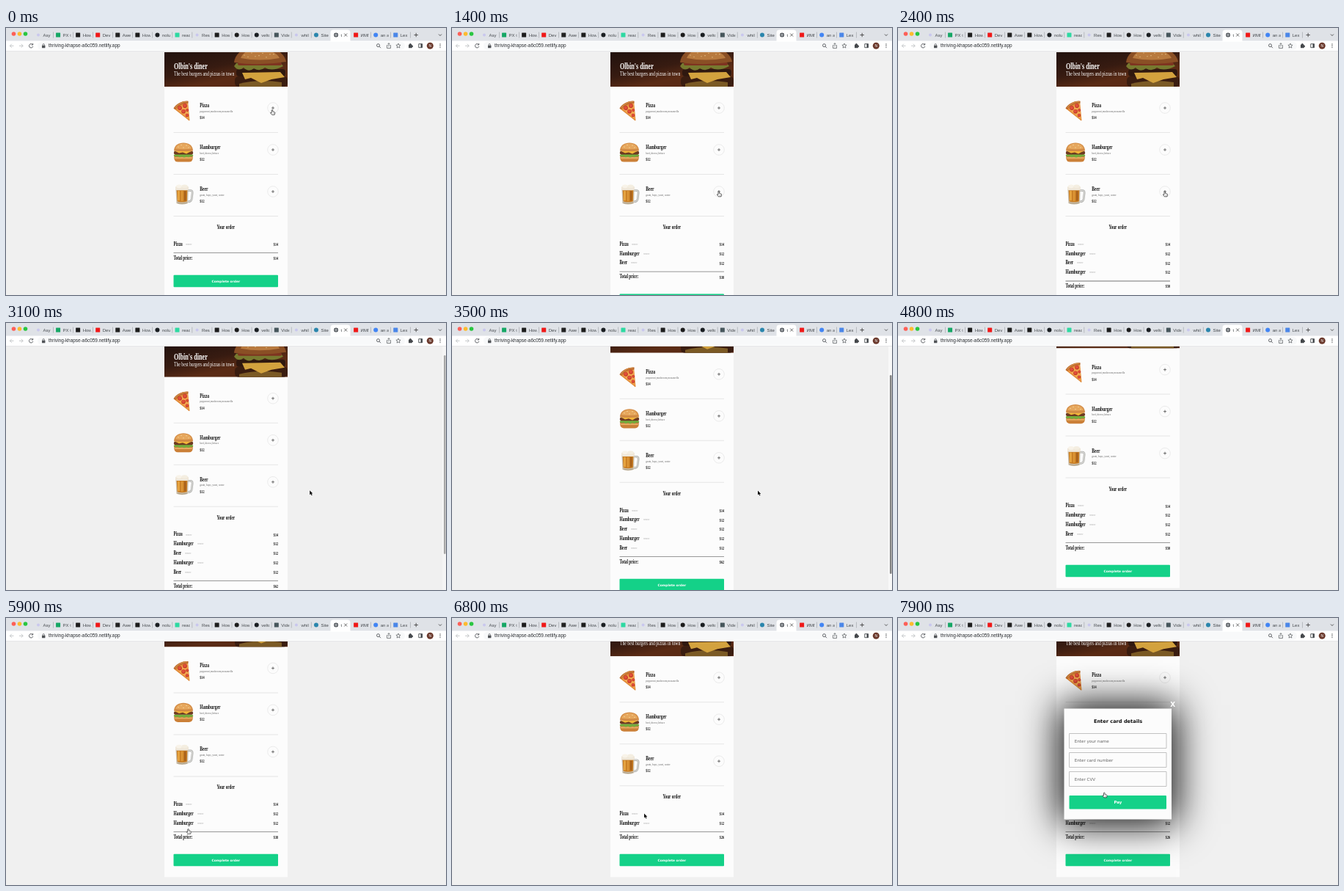
Animation, 600 px wide and 364 px high, one loop 8 s. Source, as an HTML page with a canvas:

```html
<!DOCTYPE html>
<html lang="en">
<head>
<meta charset="utf-8">
<title>Diner order</title>
<style>
html, body { margin: 0; width: 100%; height: 100%; overflow: hidden; background: #f0f0f0; }
canvas { display: block; width: 600px; height: 364px; }
</style>
</head>
<body>
<canvas id="stage" width="600" height="364"></canvas>
<script>
const ctx = document.getElementById('stage').getContext('2d');
const LOOP = 8000, VIEW_TOP = 32, ROW = 12.8;
const GREEN = '#14d188', HAIRLINE = '#e6e6e6';
const SLAB = '"Liberation Serif", serif';
const SLAB_WIDTH = .7;
const SANS = '"Liberation Sans", sans-serif';
const WIDE = '"DejaVu Sans", sans-serif';

const MENU = {
  P: { name: 'Pizza', desc: 'pepperoni,mushroom,mozzarella', price: 14, link: 16.5, draw: drawPizza },
  H: { name: 'Hamburger', desc: 'beef,cheese,lettuce', price: 12, link: 32.5, draw: drawBurger },
  B: { name: 'Beer', desc: 'grain, hops, yeast, water', price: 12, link: 15.5, draw: drawBeer }
};
const ORDERS = [[0, 'P'], [700, 'PH'], [1200, 'PHB'], [1900, 'PHBH'], [2600, 'PHBHB'],
  [4700, 'PHHB'], [5900, 'PHH'], [6500, 'PH']];
const SCROLL = [[3000, 0], [3400, 39.2], [3600, 39.2], [3900, 45.4]];
const CURSOR = [
  [0, 363, 111, 'hand'], [300, 363, 111, 'hand'], [620, 363, 168, 'hand'], [850, 363, 168, 'hand'],
  [1120, 363.8, 222.5, 'hand'], [1500, 363.8, 222.5, 'hand'], [1780, 363, 168, 'hand'],
  [2000, 363, 168, 'hand'], [2300, 363.8, 222.5, 'hand'], [2800, 363.8, 222.5, 'arrow'],
  [3150, 417, 228.5, 'arrow'], [3950, 417, 228.5, 'arrow'], [4500, 248.5, 273.5, 'hand'],
  [4700, 248.5, 273.5, 'text'], [5200, 248.5, 273.5, 'text'], [5500, 248.5, 287, 'hand'],
  [5950, 248.5, 287, 'arrow'], [6250, 262, 266.5, 'hand'], [6500, 262, 266.5, 'arrow'],
  [6850, 262, 266.5, 'arrow'], [7250, 300, 329, 'hand'], [7620, 300, 329, 'arrow'],
  [7850, 281.3, 237.5, 'hand']
];
const DIALOG_AT = 7600;

const TABS = [
  ['Asy', '#c9c7ee', 0], ['PX t', '#16a765', 1], ['How', '#1d1d1d', 1], ['Dev', '#f01818', 1],
  ['Awe', '#222', 1], ['How', '#1d1d1d', 1], ['nolu', '#1b1f23', 0], ['reac', '#2ed9a2', 1],
  ['Res', '#c9c7ee', 0], ['How', '#1d1d1d', 1], ['How', '#1d1d1d', 0], ['velto', '#1b1f23', 0],
  ['Vide', '#46565c', 1], ['whil', '#c9c7ee', 0], ['Site', '#2b86ad', 0], ['t', '#4b4f54', 0],
  ['ИМП', '#f01818', 1], ['an a', '#4285f4', 0], ['Lex', '#4a86e8', 1]
];
const ACTIVE_TAB = 15;

function rect(x, y, w, h, color, r = 0) {
  ctx.fillStyle = color;
  ctx.beginPath();
  ctx.roundRect(x, y, w, h, r);
  ctx.fill();
}
function disc(x, y, rx, color, ry = rx, angle = 0) {
  ctx.fillStyle = color;
  ctx.beginPath();
  ctx.ellipse(x, y, rx, ry, angle, 0, 7);
  ctx.fill();
}
function shape(d, fill, line, width = 1) {
  const p = new Path2D(d);
  if (fill) { ctx.fillStyle = fill; ctx.fill(p); }
  if (line) { ctx.strokeStyle = line; ctx.lineWidth = width; ctx.stroke(p); }
}
function text(str, x, y, font, color, align = 'left') {
  ctx.font = font;
  ctx.fillStyle = color;
  ctx.textAlign = align;
  ctx.fillText(str, x, y);
}
function at(x, y, draw, sx = 1, sy = sx) {
  ctx.save();
  ctx.translate(x, y);
  ctx.scale(sx, sy);
  draw();
  ctx.restore();
}
// The page's condensed slab face.
function slab(str, x, y, size, color = '#111', align = 'left', weight = 'bold') {
  at(x, y, () => text(str, 0, 0, `${weight} ${size}px ${SLAB}`, color, align), SLAB_WIDTH, 1);
}

const ease = u => u * u * (3 - 2 * u);
// Eased position on a list of [time, ...values] keys.
function track(keys, t) {
  let i = 0;
  while (i < keys.length - 1 && keys[i + 1][0] <= t) i++;
  const a = keys[i], b = keys[i + 1] || a;
  const u = b === a ? 0 : ease(Math.max(0, (t - a[0]) / (b[0] - a[0])));
  return a.map((v, k) => typeof v === 'number' ? v + (b[k] - v) * u : v);
}
const stepAt = (keys, t) => keys.filter(k => k[0] <= t).pop()[1];

function drawPizza() {
  shape('M1 11C4 5 12 0 20 1L22.5 27Q21.5 28 20 26Z', '#e08a3a');
  shape('M5 12Q11 6 20 4L21.5 25.5Z', '#f2a850');
  shape('M1.7 11.2C5 5.5 13 1.5 20.5 2.2', null, '#b9682c', 3);
  shape('M2.5 10C6 4.8 13 1.2 19 1.5', null, '#d8924c', 1.1);
  for (const [x, y, r] of [[9, 10, 2.9], [16, 7, 2.9], [14, 14.7, 2.8], [19.2, 13, 2], [18.9, 20, 2.2]]) {
    disc(x, y, r, '#bf3525');
    disc(x - .2, y - .3, r * .76, '#e0503a');
  }
}

function drawBurger() {
  rect(1.3, 19, 25.4, 7.6, '#cb8038', [1, 1, 5, 5]);
  rect(2, 20, 24, 2.2, '#e6aa62', 1);
  rect(1.2, 17.2, 25.6, 2.4, '#cf4a35', 1.2);
  shape('M.6 17.8Q1 16 4 16H24Q27 16 27.4 17.8Q26 20.6 23 19Q21 21.6 18 19.2Q15 22 12 19.2Q9 21.6 6 19Q3 21 .6 17.8Z', '#74ad3c');
  rect(.9, 11.8, 26.2, 4.6, '#6d3a22', 2);
  shape('M1.4 11.6H26.6L22 13.2L18 15.6L13 13.4L8 14.6L5 13Z', '#f3b63a');
  shape('M1 11.4C1 4 7 .4 14 .4S27 4 27 11.4Q14 12.8 1 11.4Z', '#d28b45');
  shape('M3 8.5C4 4 8 1.6 14 1.6S24 4 25 8.5Q14 10 3 8.5Z', '#e6a75d');
  for (const [x, y] of [[7, 6], [11, 3.6], [14, 7], [18, 4], [21, 7]]) disc(x, y, .8, '#f8e0a8', .5);
}

function drawBeer() {
  const handle = 'M19 8.5H23.3Q26.5 8.5 26.2 12L25.2 20Q24.7 23.8 20 23.8';
  shape(handle, null, '#a9a9a6', 2.6);
  shape(handle, null, '#dededb', 1.2);
  shape('M3.3 4H20.7L20.2 26Q12 29 4.4 26Z', '#cfc5b4');
  shape('M4.7 8H19.3L18.8 23.5Q12 25.5 5.6 23.5Z', '#c67b22');
  rect(6, 9, 3, 13.5, '#e5a33f', 1);
  rect(10.5, 9, 3, 14.2, '#dc9535', 1);
  rect(15, 9, 2.5, 13.5, '#a8611b', 1);
  shape('M5.5 25.3Q12 27.5 19 25.3', null, '#a99778', 1);
  rect(3, 2.2, 18, 6, '#f0e8da', 2.5);
  disc(8, 2.8, 3.8, '#f8f3e9', 2.4);
  disc(15.5, 2.7, 4, '#f4eee1', 2.3);
}

function drawBanner() {
  ctx.save();
  ctx.beginPath();
  ctx.rect(216, 33, 168, 47);
  ctx.clip();
  const wood = ctx.createLinearGradient(240, 33, 250, 80);
  wood.addColorStop(0, '#24130e');
  wood.addColorStop(.6, '#371b11');
  wood.addColorStop(1, '#5a2b15');
  rect(216, 33, 168, 47, wood);
  rect(312, 66, 72, 14, '#3a1d10', 5);
  shape('M318 76Q345 69 376 74V80H318Z', '#7b5a25');
  rect(314, 56, 67, 10, '#2f180f', 4);
  shape('M322 61L374 60L380 67L362 70L348 75L334 68L326 70Z', '#d3a23e');
  shape('M311 52Q317 60 324 54Q331 61 338 55Q346 60 353 54Q363 60 378 52L374 47L314 48Z', '#77792f');
  rect(316, 47, 60, 4, '#7e3420', 2);
  shape('M311 47C312 35 325 24 345 24S380 34 382 46Q346 52 311 47Z', '#8a4f25');
  shape('M320 41C324 31 336 27 348 28S370 35 373 41Q346 46 320 41Z', '#b87a3f');
  for (let i = 0; i < 9; i++) disc(325 + i * 5, 37 + 3 * Math.sin(i * 2.3), 1, '#dcb67c', .6);
  ctx.restore();
  slab("Olbin's diner", 229, 56, 11.6, '#fff');
  slab('The best burgers and pizzas in town', 229, 65, 8.2, '#fff', 'left', 'normal');
}

function drawMenuItem(item, i) {
  const y = i * 57;
  at(228, 99 + y, item.draw);
  slab(item.name, 264.3, 108 + y, 8);
  slab(item.desc, 264.3, 114.7 + y, 4.9, '#666', 'left', 'normal');
  slab('$' + item.price, 264.3, 124 + y, 5.9);
  ctx.strokeStyle = HAIRLINE;
  ctx.lineWidth = .8;
  ctx.beginPath();
  ctx.arc(364, 109 + y, 7.3, 0, 7);
  ctx.stroke();
  shape(`M362 ${109 + y}h4M364 ${107 + y}v4`, null, '#555', .8);
  rect(228.5, 142 + y, 142.5, 1, HAIRLINE);
}

function drawPage(order, scroll) {
  ctx.save();
  ctx.beginPath();
  ctx.rect(0, VIEW_TOP, 600, 364);
  ctx.clip();
  ctx.translate(0, -scroll);
  const extra = (order.length - 1) * ROW;
  rect(216, 33, 168, 335.3 + extra, '#fcfcfc');
  drawBanner();
  Object.values(MENU).forEach(drawMenuItem);
  slab('Your order', 299.7, 273.9, 7.4, '#111', 'center');
  let total = 0;
  [...order].forEach((key, i) => {
    const { name, price, link } = MENU[key], y = 296.7 + i * ROW;
    total += price;
    slab(name, 228.5, y, 7.7);
    slab('remove', 228.5 + link, y - .9, 4, '#aaa', 'left', 'normal');
    slab('$' + price, 371, y + .2, 5.9, '#111', 'right');
  });
  rect(228.5, 306.2 + extra, 142.5, .8, '#777');
  slab('Total price:', 228.5, 315.8 + extra, 7.5);
  slab('$' + total, 371, 316 + extra, 5.9, '#111', 'right');
  rect(228.5, 336.8 + extra, 142.5, 16.5, GREEN, 1);
  text('Complete order', 299.8, 346.7 + extra, `bold 4.4px ${WIDE}`, '#fff', 'center');
  ctx.restore();
}

function drawDialog() {
  // Only the shadow of this off-stage box is visible.
  ctx.save();
  ctx.shadowColor = '#000';
  ctx.shadowBlur = 50;
  ctx.shadowOffsetX = 1000;
  rect(-779.5, 117.5, 158.5, 163, '#000');
  ctx.restore();
  text('X', 374.7, 121.3, `bold 9px ${WIDE}`, '#fff', 'center');
  rect(226.5, 123.5, 146.5, 151, '#fcfcfc');
  text('Enter card details', 300, 143, `bold 6.6px ${WIDE}`, '#111', 'center');
  ['Enter your name', 'Enter card number', 'Enter CVV'].forEach((hint, i) => {
    const y = 157.5 + i * 26;
    ctx.strokeStyle = '#c2c2c2';
    ctx.lineWidth = 1;
    ctx.strokeRect(233.5, y, 132.5, 20);
    text(hint, 240.7, y + 12.2, `5.6px ${WIDE}`, '#666');
  });
  rect(233.5, 242, 132.5, 18.5, GREEN, 1);
  text('Pay', 299.8, 253.3, `bold 5.4px ${WIDE}`, '#fff', 'center');
}

function drawTabs() {
  rect(0, 0, 600, 18, '#dfe2e7');
  ['#fe5f57', '#febb2e', '#29c640'].forEach((c, i) => disc(10.5 + i * 8, 8, 2.8, c));
  rect(442.5, 2.5, 27, 16, '#fff', [4, 4, 0, 0]);
  TABS.forEach(([label, color, square], i) => {
    const x = 44 + i * 27.07;
    if (square) rect(x - 3, 6.5, 6, 6, color, .5);
    else disc(x, 9.5, color === '#c9c7ee' ? 2 : 3, color);
    ctx.save();
    ctx.beginPath();
    ctx.rect(x + 5, 0, i === ACTIVE_TAB ? 5 : 12.5, 18);
    ctx.clip();
    text(label, x + 6.5, 11.6, `6px ${SANS}`, '#45494d');
    ctx.restore();
    if (i !== ACTIVE_TAB && i !== ACTIVE_TAB - 1) rect(x + 20, 5.5, .7, 8, '#a5a9ae');
  });
  shape('M447.5 9.5h5M450 7v5', null, '#dfe2e7', .7);
  shape('M461.2 7.5l4 4M465.2 7.5l-4 4', null, '#444', .8);
  shape('M556.5 9.5h5.4M559.2 6.8v5.4M590 8.5l2 2l2 -2', null, '#444', .9);
}

function drawToolbar() {
  rect(0, 17.5, 600, 14.5, '#fff');
  rect(43, 18.7, 501, 11.2, '#f8f9fa', 5.6);
  rect(0, 31.2, 600, .8, '#dcdee0');
  shape('M10.5 24.3h-5M7.8 21.8l-2.5 2.5l2.5 2.5M18 24.3h5M20.7 21.8l2.5 2.5l-2.5 2.5', null, '#b7babd', .8);
  shape('M36.3 22.6A2.7 2.7 0 1 0 36.8 25M36.7 21v2h-2', null, '#505357', .9);
  rect(49, 23.8, 4.4, 3.4, '#505357', .5);
  shape('M50 24v-1.2a1.2 1.2 0 0 1 2.4 0v1.2', null, '#505357', .7);
  text('thriving-khapse-a6c059.netlify.app', 58, 26.4, `6.45px ${SANS}`, '#2c2f33');
  shape('M509.5 23.7a2 2 0 1 0 -4 0a2 2 0 1 0 4 0M509 25.2l2 2', null, '#505357', .9);
  shape('M520.5 23.5h-1v4h5v-4h-1M522 25.5v-4.7M520.6 22l1.4 -1.4l1.4 1.4', null, '#505357', .7);
  shape('M535 21l.9 2.1l2.2 .2l-1.7 1.5l.5 2.3l-1.9 -1.2l-1.9 1.2l.5 -2.3l-1.7 -1.5l2.2 -.2Z', null, '#505357', .7);
  rect(549, 22.5, 4.8, 4.8, '#45484c', .6);
  disc(551.4, 22.3, 1.2, '#45484c');
  disc(554, 24.9, 1.1, '#45484c');
  shape('M562.8 21.7h4.8v5h-4.8Z', null, '#45484c', .9);
  rect(565.5, 21.7, 2.2, 5, '#45484c');
  disc(578.3, 24.3, 4.5, '#6b392c');
  text('N', 578.3, 26.1, `5px ${SANS}`, '#fff', 'center');
  for (const y of [22, 24.3, 26.6]) disc(592, y, .7, '#45484c');
}

function drawCursor(x, y, kind) {
  ctx.lineJoin = 'round';
  at(x, y, () => {
    if (kind === 'hand') {
      shape('M-.8 1Q0 0 .8 1V3L3.2 3.6Q4 3.9 3.8 4.8L3.2 7.3H-.4L-2.5 4.6Q-2.2 3.6 -.8 4.7Z', '#fff', '#222', .7);
      shape('M1.2 4.8v1.3M2.3 4.8v1.3', null, '#555', .4);
    } else if (kind === 'text') {
      shape('M-1.2 -3.5Q0 -3.5 0 -2.6Q0 -3.5 1.2 -3.5M0 -2.6V2.8M-1.2 3.6Q0 3.6 0 2.7Q0 3.6 1.2 3.6', null, '#222', .8);
    } else {
      const arrow = 'M0 0V6L1.4 4.8L2.4 7L3.5 6.5L2.5 4.4H4.3Z';
      shape(arrow, null, '#fff', 1.1);
      shape(arrow, '#111');
    }
  });
}

function drawScrollbar(scroll, t) {
  if (t < 3000 || t > 4500) return;
  ctx.globalAlpha = Math.min(1, (t - 3000) / 150, (4500 - t) / 250);
  rect(595, VIEW_TOP, 5, 332, '#f8f8f8');
  rect(597, 71 + (scroll - 39.2) * .82, 2.6, 271, '#858585', 1.3);
  ctx.globalAlpha = 1;
}

function render(t) {
  const order = stepAt(ORDERS, t);
  // A shorter order shortens the page and so limits the scroll.
  const scroll = Math.min(track(SCROLL, t)[1], 2.2 + order.length * ROW);
  const [, x, y, kind] = track(CURSOR, t);
  rect(0, 0, 600, 364, '#f0f0f0');
  drawPage(order, scroll);
  drawScrollbar(scroll, t);
  if (t >= DIALOG_AT) drawDialog();
  drawTabs();
  drawToolbar();
  drawCursor(x, y, kind);
}

function frame() {
  render(performance.now() % LOOP);
  requestAnimationFrame(frame);
}
frame();
</script>
</body>
</html>
```
